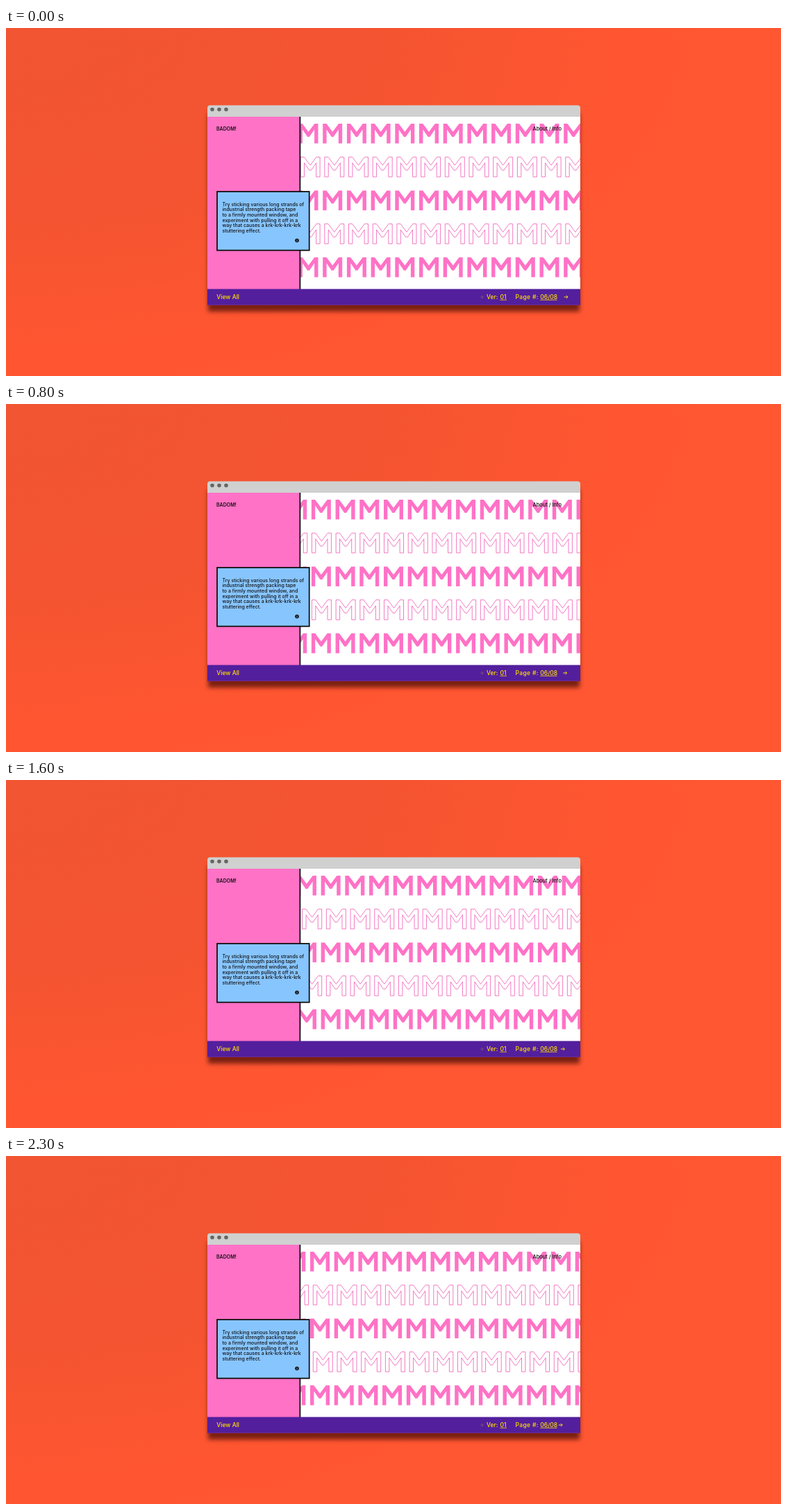
Write an HTML page that moves like this. It is 1116x502 px and loops after 2.4 s.

```html
<!DOCTYPE html>
<html lang="en">
<head>
<meta charset="utf-8">
<title>Sound cards</title>
<style>
  html, body { margin: 0; width: 100%; height: 100%; overflow: hidden; }
  body { background: radial-gradient(1000px 526px at 0 0, #f15532, #f45431 52%, #ff5631 90%, #ff5731); }
  svg { position: absolute; left: 0; top: 0; }
  .window {
    position: absolute; left: 290px; top: 111.5px; width: 537px; height: 288px;
    border-radius: 4px 4px 0 0; box-shadow: 0 10px 6px -1px rgba(50, 5, 0, .65);
  }
  text { font: 500 7px Inter, sans-serif; fill: #111; }
  .bar text { font-size: 8.5px; fill: #ffdf00; }
</style>
</head>
<body>
<div class="window"></div>
<svg width="1116" height="502" viewBox="0 0 1116 502">
  <defs>
    <clipPath id="pane"><rect x="424" y="128" width="403" height="249"/></clipPath>
    <path id="m" d="M0 28.6V0H5.200L14 11.800L22.800 0H28V28.600H22.600V8.400L15.400 18.900H12.600L5.400 8.400V28.600Z"/>
  </defs>

  <path fill="#d0d0d0" d="M290 129V115.500q0-4 4-4H823q4 0 4 4V129Z"/>
  <g fill="#666"><circle cx="297" cy="117.500" r="2.800"/><circle cx="307" cy="117.500" r="2.800"/><circle cx="317" cy="117.500" r="2.800"/></g>
  <rect x="290" y="128" width="537" height="249" fill="#fff"/>
  <rect x="290" y="128" width="133" height="249" fill="#ff72c6"/>
  <g id="rows" clip-path="url(#pane)"></g>
  <rect x="422.500" y="128" width="1.800" height="249" fill="#111"/>

  <text x="303" y="147.500" style="font-weight:600">BADOM!</text>
  <text x="758.500" y="147.500" style="font-size:7.4px">About / Info</text>

  <rect x="304" y="236" width="132.700" height="84.700" fill="#87c5ff" stroke="#111" stroke-width="1.800"/>
  <g id="note"></g>
  <circle cx="419" cy="306.500" r="2.800" fill="#111"/>
  <text x="419" y="307.900" text-anchor="middle" style="font-size:4px;fill:#87c5ff">2</text>

  <g class="bar">
    <rect x="290" y="376.500" width="537" height="23.300" fill="#531f9d"/>
    <text x="303.300" y="391">View All</text>
    <path d="M683 388h5.200M685.600 385.600v4.800" stroke="#ffdf00" stroke-width=".9" opacity=".25"/>
    <text x="692" y="391">Ver:</text>
    <text x="711.500" y="391">01</text>
    <text x="733.500" y="391" letter-spacing=".35">Page #:</text>
    <text x="769.300" y="391">06/08</text>
    <path d="M711.500 392.300H721M769.300 392.300H793.500" stroke="#ffdf00" stroke-width=".8"/>
    <path id="arrow" d="M-2.800 0H2.500M.4-2.200L2.600 0L.4 2.200" fill="none" stroke="#ffdf00" stroke-width="1"/>
  </g>
</svg>
<script>
const NS = 'http://www.w3.org/2000/svg';
const PITCH = 34.7, SPEED = 2.3, LEFT = 389;
// progress shown during each tenth of a second, with its holds and jumps
const PROGRESS = [0, .6, 1.2, 1.8, 2.4, 3, 7.1, 7.1, 7.1, 7.1, 10.8, 10.8,
  10.8, 14.3, 15.2, 15.2, 16.2, 17.2, 17.2, 17.2, 20, 21, 22, 23];

function add(parent, tag, attrs) {
  const el = document.createElementNS(NS, tag);
  for (const k in attrs) el.setAttribute(k, attrs[k]);
  return parent.appendChild(el);
}

const rows = [0, 1, 2, 3, 4].map(i => {
  const look = i % 2
    ? { fill: 'none', stroke: '#f062b8', 'stroke-width': .85 }
    : { fill: '#ff72c6' };
  const g = add(document.getElementById('rows'), 'g', look);
  for (let k = 0; k < 14; k++) add(g, 'use', { href: '#m', x: k * PITCH });
  return g;
});

['Try sticking various long strands of',
 'industrial strength packing tape',
 'to a firmly mounted window, and',
 'experiment with pulling it off in a',
 'way that causes a krk-krk-krk-krk',
 'stuttering effect.'].forEach((line, i) => {
  add(document.getElementById('note'), 'text', { x: 311.5, y: 256.5 + i * 7.7 }).textContent = line;
});

const arrow = document.getElementById('arrow');
const wrap = x => LEFT + ((x - LEFT) % PITCH + PITCH) % PITCH;

function draw() {
  const p = PROGRESS[Math.floor(performance.now() % 2400 / 100)];
  rows.forEach((g, i) => {
    const x = i % 2 ? wrap(458.8 + p * SPEED) : wrap(456.2 - p * SPEED);
    g.setAttribute('transform', `translate(${x} ${138 + i * 48.2})`);
  });
  arrow.setAttribute('transform', `translate(${806.4 - 7.8 * (p / 23) ** 1.5} 388)`);
  requestAnimationFrame(draw);
}
draw();
</script>
</body>
</html>
```
